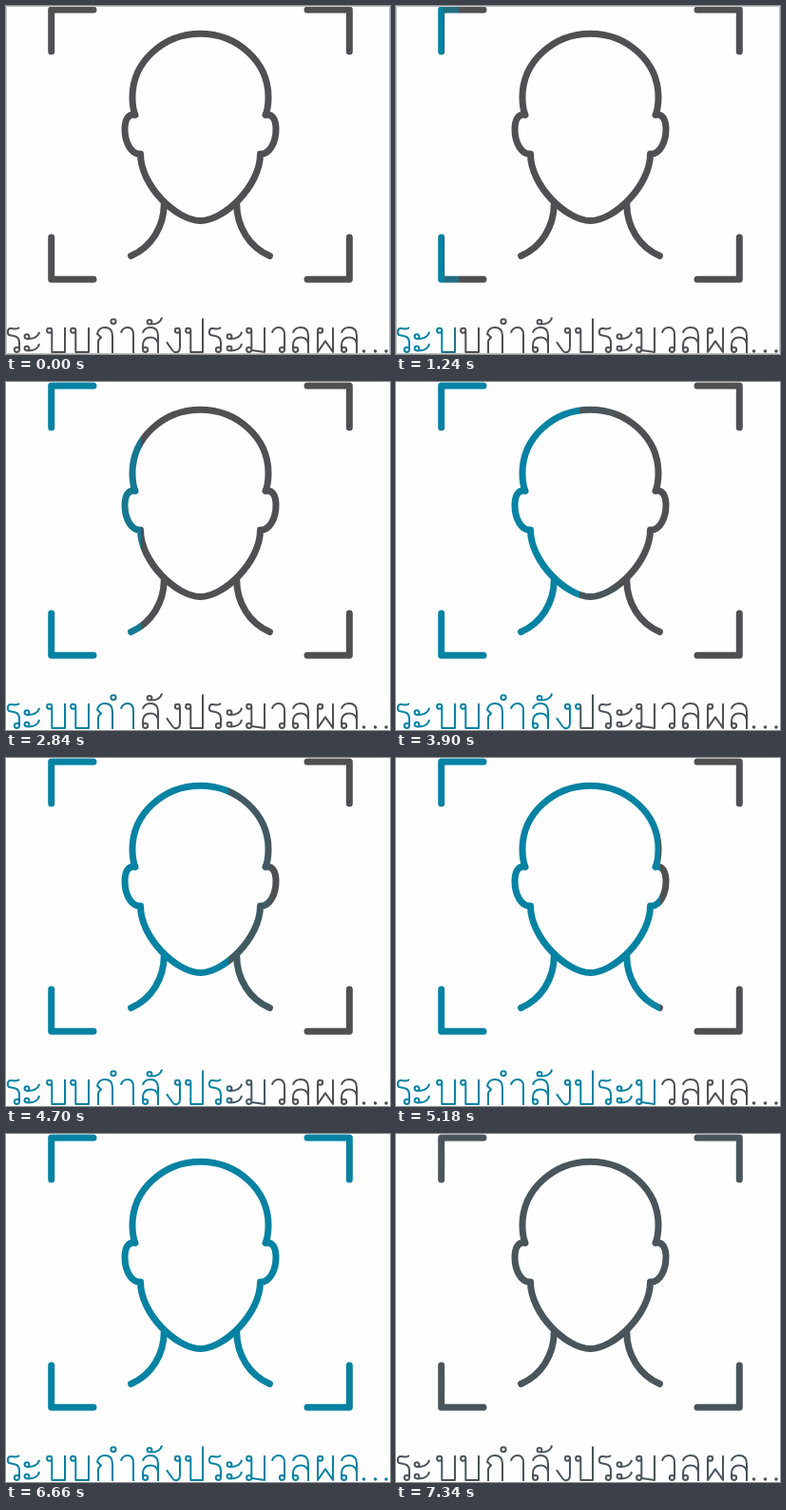
Write an HTML page with a canvas that moves like this. It is 404 by 367 pixels and loops after 7.4 s.

```html
<!DOCTYPE html>
<html lang="th">
<head>
<meta charset="utf-8">
<title>ระบบกำลังประมวลผล...</title>
<style>
html, body { margin: 0; width: 100%; height: 100%; overflow: hidden; background: #fefefe; }
canvas { display: block; }
</style>
</head>
<body>
<canvas id="stage" width="404" height="367" role="img" aria-label="ระบบกำลังประมวลผล..."></canvas>
<script>
const W = 404, H = 367, AXIS = 204.5;
const ctx = document.getElementById('stage').getContext('2d');
const GREY = [80, 80, 82], BLUE = [6, 130, 162];

// Timing: each stage holds, then fades to the next in ten steps.
const LOOP = 7400, STAGE = 740, HOLD = 200, STEP = 60;
const EXTENTS = [0, 50, 66, 104, 142, 193, 234, 278, 320, W];

const halfBrackets = new Path2D('M47.7 48 V4 H92 M47.7 244 V288.3 H92');
const halfHead = new Path2D(
  'M204.5 29.2 C165.5 29.2 133 59 133 96 C133 101 133 108 136 115 ' +
  'C128 113 125 121 125 130 C125 144 132 157 141.5 156 ' +
  'C141.5 190 180 226.5 204.5 226.5 ' +
  'M166.3 208 C166.3 233 153 254 131.6 263.5');

// Single-line letters: top of the body at 0, baseline at 28.
const ring = (x, y, r = 2.6) =>
  `M${x - r} ${y} a${r} ${r} 0 1 0 ${2 * r} 0 a${r} ${r} 0 1 0 ${-2 * r} 0 `;
const hook = (x, y) =>
  ring(x, y, 2.4) + `M${x} ${y + 2.4} C${x + 7} ${y + 3} ${x + 12} ${y} ${x + 13} ${y - 5} `;
const arch = 'M2 6 C3 2 6 0 10 0 C15 0 18 3 18 9 V28 ';
const smallArch = 'M1 6 C2 2 4 0 8 0 C12 0 14 3 14 8 ';
const GLYPHS = {
  'ร': 'M14 0 C11 3 8 1 5 1 C1 1 1 8 4 8.5 C10 9.5 14 10 14 17 V24 ' + ring(11.4, 24.5),
  'ะ': hook(4, 10) + hook(4, 23),
  'บ': ring(3.7, 3.5) + 'M6.3 3.5 V27 H20 V0',
  'ป': ring(3.7, 3.5) + 'M6.3 3.5 V27 H19 V-10',
  'ก': 'M3 28 V16 C3 13 5 12 6 11 L2 7 C3 2 6 0 10 0 C15 0 18 3 18 9 V28',
  'ำ': ring(-7, -6.5) + smallArch + 'V28',
  'ล': arch + 'M18 18 C17 12 13 11 10 11 C5 11 2 14 2 20 V24 ' + ring(4.6, 24.5),
  'ั': hook(0, -6),
  'ง': ring(11.4, 3.5) + 'M14 3.5 V21 C14 28 9 29 6 25 L0 16',
  'ม': ring(3.7, 3.5) + 'M6.3 3.5 V25 L20 27 V0 ' + ring(3.7, 24.5),
  'ว': smallArch + 'V24 ' + ring(11.4, 24.5),
  'ผ': ring(4.6, 3.5) + 'M2 3.5 V27 L10 15 L18 27 V0'
};
const LETTERS = [
  ['ร', 0], ['ะ', 18], ['บ', 42], ['บ', 67], ['ก', 94], ['ำ', 120],
  ['ล', 142], ['ั', 151], ['ง', 169], ['ป', 188], ['ร', 212], ['ะ', 231],
  ['ม', 252], ['ว', 279], ['ล', 300], ['ผ', 326], ['ล', 351]
];
const label = new Path2D();
for (const [ch, x] of LETTERS) {
  label.addPath(new Path2D(GLYPHS[ch]), new DOMMatrix([1, 0, 0, 0.96, x, 339]));
}

function mirrored(path) {
  const both = new Path2D(path);
  both.addPath(path, new DOMMatrix([-1, 0, 0, 1, 2 * AXIS, 0]));
  return both;
}
const icon = mirrored(halfHead);
icon.addPath(mirrored(halfBrackets));

const mix = p => 'rgb(' + GREY.map((g, i) => Math.round(g + (BLUE[i] - g) * p)) + ')';

// Blue up to the current extent, a blend up to the next one, grey beyond.
function paintAt(t) {
  const k = Math.floor(t / STAGE), u = t % STAGE;
  const p = u < HOLD ? 0 : (Math.floor((u - HOLD) / STEP) + 1) / 10;
  if (k === EXTENTS.length - 1) return mix(1 - p);
  const a = EXTENTS[k] / W, b = EXTENTS[k + 1] / W;
  const g = ctx.createLinearGradient(0, 0, W, 0);
  for (const [from, to, amount] of [[0, a, 1], [a, b, p], [b, 1, 0]]) {
    g.addColorStop(from, mix(amount));
    g.addColorStop(to, mix(amount));
  }
  return g;
}

function draw(t) {
  ctx.fillStyle = '#fefefe';
  ctx.fillRect(0, 0, W, H);
  ctx.strokeStyle = ctx.fillStyle = paintAt(t);
  ctx.lineJoin = ctx.lineCap = 'round';
  ctx.lineWidth = 7;
  ctx.stroke(icon);

  ctx.lineCap = 'butt';
  ctx.lineWidth = 2;
  ctx.stroke(label);
  for (const x of [376.5, 388.5, 400]) {
    ctx.beginPath();
    ctx.arc(x, 364, 1.8, 0, 7);
    ctx.fill();
  }

  if (t < 2 * STAGE) {
    ctx.strokeStyle = '#c4c4c4';
    ctx.lineWidth = 1;
    ctx.strokeRect(0.5, 0.5, W - 1, H - 1);
  }
}

const start = performance.now();
function tick() {
  draw((performance.now() - start) % LOOP);
  requestAnimationFrame(tick);
}
tick();
</script>
</body>
</html>
```
